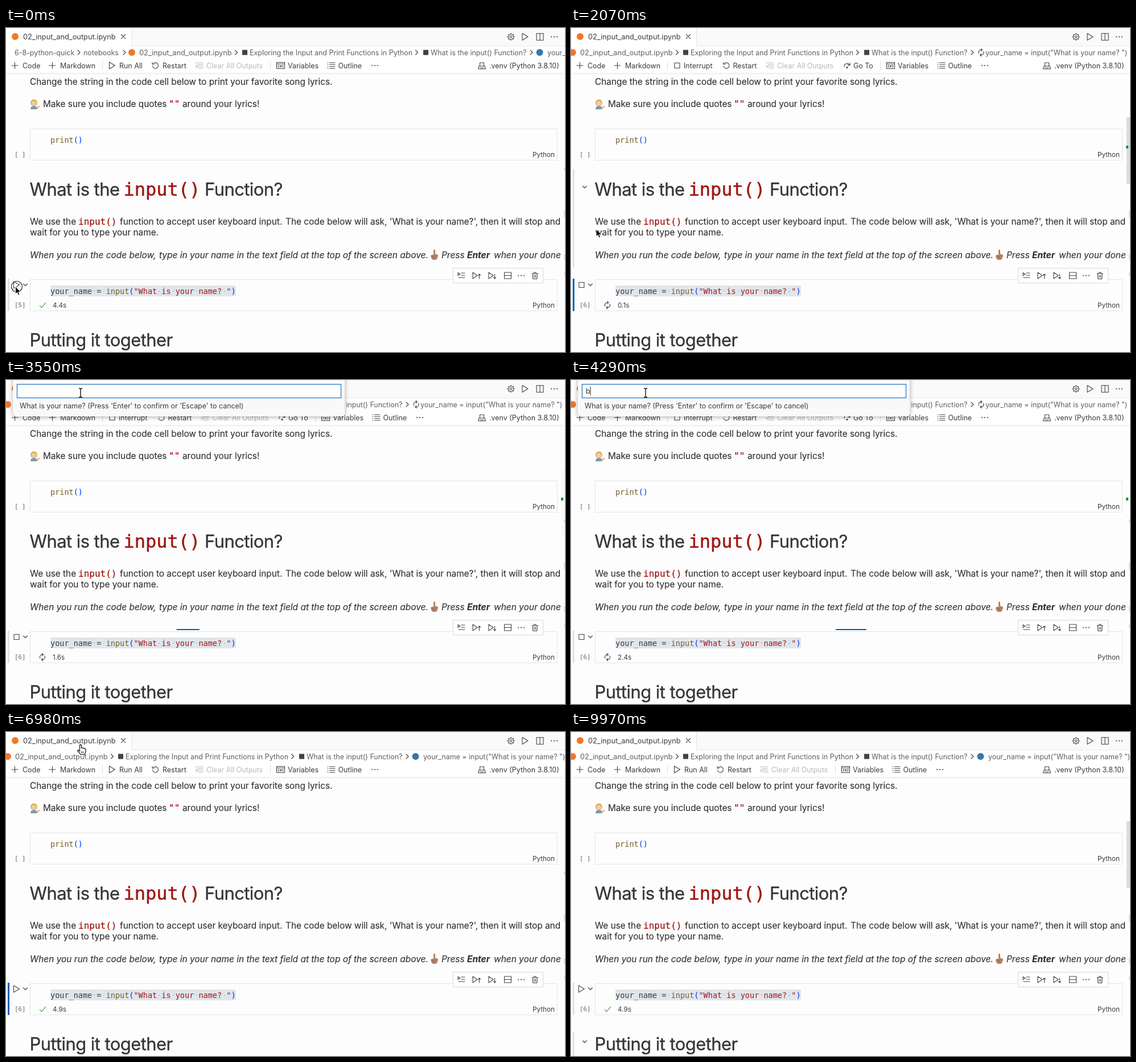
An HTML page that plays this animation: 982 px wide and 570 px high, repeating every 9990 ms.

```html
<!DOCTYPE html>
<html lang="en">
<head>
<meta charset="utf-8">
<title>Notebook input demo</title>
<style>
html, body { margin: 0; width: 100%; height: 100%; overflow: hidden; background: #fdfdfd; }
svg { display: block; width: 982px; height: 570px; }
text { font: 12.45px Inter, "Open Sans", sans-serif; font-optical-sizing: none; fill: #3b3b3b; white-space: pre; }
.file { font-size: 12.8px; }
.crumb text { fill: #5f5f5f; }
.small { font-size: 11.7px; }
.body { font-size: 15.36px; fill: #303030; stroke: #303030; stroke-width: .12; }
.head { font-size: 31px; letter-spacing: -.58px; fill: #363636; stroke: #363636; stroke-width: .35; }
.mono { font-family: "DejaVu Sans Mono", "Liberation Mono", monospace; font-size: 13.53px; }
.red { fill: #a31515; }
text.red { stroke: #a31515; stroke-width: .25; }
.brown { fill: #795e26; }
.blue { fill: #0431fa; }
.ital { font-style: italic; font-size: 15.45px; }
.off text { fill: #b9b9b9; }
.line { fill: none; stroke: #424242; stroke-width: 1.1; stroke-linejoin: round; stroke-linecap: round; }
.off .line { stroke: #b9b9b9; }
</style>
</head>
<body>
<svg id="stage" viewBox="0 0 982 570"></svg>
<script>
const LOOP = 9990, STEP = 148.6, LEAD = 25;
const NAME = "bolmup", KEY_TIMES = [4130, 4720, 5100, 5500, 5880, 6060];
const CHAR = 8.15, CODE_X = 78;
const CELLS = [[80, 146], [177, 233], [248, 421], [441, 498], [528, 570]];
const ACCENT = "#005fb8", IDLE_BAR = "#e1e1e1";

const text = (x, y, s, cls = "", extra = "") => `<text x="${x}" y="${y}" class="${cls}" ${extra}>${s}</text>`;
const rect = (x, y, w, h, fill, extra = "") => `<rect x="${x}" y="${y}" width="${w}" height="${h}" fill="${fill}" ${extra}/>`;
const line = (d, extra = "") => `<path class="line" d="${d}" ${extra}/>`;
const dot = (x, y, r, fill) => `<circle cx="${x}" cy="${y}" r="${r}" fill="${fill}"/>`;
const group = (id, body, extra = "") => `<g id="${id}" ${extra}>${body}</g>`;
const at = (x, y, body, extra = "") => `<g transform="translate(${x} ${y})" ${extra}>${body}</g>`;
const span = (cls, s) => `<tspan class="${cls}">${s}</tspan>`;

const plus = x => line(`M${x - 5.5} 66h11M${x} 60.5v11`);
const dots = (x, y) => [-5, 0, 5].map(d => dot(x + d, y, 1.1, "#424242")).join("");
const play = (x, y) => line(`M${x - 4.5} ${y - 6}l10 6l-10 6z`);
const down = (x, y) => line(`M${x - 3.5} ${y - 2}l3.5 3.5l3.5-3.5`);
const chevron = x => line(`M${x - 2} 39l4 4l-4 4`);
const sync = line("M-4.3-1.5A4.6 4.6 0 0 1 4-2.3M4.3 1.5A4.6 4.6 0 0 1-4 2.3M4.3-5v3h-3M-4.3 5v-3h3");
const divider = x => rect(x, 58, 1, 16, "#dcdcdc");

const iconRestart = x => at(x, 66, line("M-3.6-3.4A5 5 0 1 1-5 .7M-5.4-5.4v3.2h3.2"));
const iconClear = x => at(x, 66, line("M-6.5-4.5h13M-3-1.5h9.5M-1 1.5h7.5M-1 4.5h7.5M-6.5 0l4 4m0-4l-4 4"));
const iconVars = x => at(x, 66, line("M-7-5.5h14v11h-14zM-7-3h14M-3.6-.8q-1.5 2 0 4M3.6-.8q1.5 2 0 4M-1.5-.5l3 3.4m0-3.4l-3 3.4"));
const iconOutline = x => at(x, 66, line("M-6.5-5h1M-6.5-1.7h1M-6.5 1.7h1M-6.5 5h1M-3-5h9.5M-3-1.7h9.5M-3 1.7h9.5M-3 5h9.5"));
const iconGoTo = x => at(x, 66, line("M-5 2a5 5 0 0 1 9.5-2.5M5-4.5v4h-4") + dot(0, 3.5, 1.6, "#424242"));

function tabBar() {
  const teeth = Array.from({ length: 8 }, (_, i) =>
    `<path class="line" d="M0-5v-1.3" transform="rotate(${i * 45})"/>`).join("");
  return rect(0, 0, 982, 80, "#fff") + rect(220, 0, 762, 31, "#fafafa") +
    rect(220, 0, 1, 31, "#e5e5e5") + rect(220, 31, 762, 1, "#e8e8e8") +
    dot(16, 15, 6, "#f37726") + text(30, 19.5, "02_input_and_output.ipynb", "file") +
    line("M202.5 11.5l7 7m0-7l-7 7") +
    at(887, 15.5, `<circle class="line" r="4.8"/><circle class="line" r="1.8"/>` + teeth) +
    play(911.5, 15.5) + line("M932 9.5h12v12h-12zM938 9.5v12") + dots(963, 15.5);
}

function breadcrumb() {
  const square = x => rect(x, 38.5, 9, 9, "#424242");
  return group("crumbs",
    text(15, 47.5, "6-8-python-quick") + chevron(128) + text(136, 47.5, "notebooks") + chevron(208) +
    dot(221, 43, 6, "#f37726") + text(234, 47.5, "02_input_and_output.ipynb", "file") + chevron(404.5) +
    square(415) + text(428, 47.5, "Exploring the Input and Print Functions in Python") + chevron(721.5) +
    square(733) + text(746, 47.5, "What is the input() Function?") + chevron(923) +
    group("crumbIcon", dot(937.5, 43, 6, "#3776ab")) +
    at(938.5, 43, group("crumbSpin", sync)) +
    `<text id="crumbCode" x="951" y="47.5">your_name = input("What is your name? ")</text>`, `class="crumb"`);
}

function toolbar() {
  const clear = x => `<g class="off">${iconClear(x)}${text(x + 12.5, 70.5, "Clear All Outputs")}</g>`;
  const tail = x => divider(x) + iconVars(x + 18.5) + text(x + 31, 70.5, "Variables") +
    iconOutline(x + 107.5) + text(x + 119.5, 70.5, "Outline") + dots(x + 184, 66);
  return group("markdownHover", rect(72, 57, 88, 18, "#ebebeb", `rx="4"`)) +
    plus(15.5) + text(29, 70.5, "Code") + plus(81.5) + text(95, 70.5, "Markdown") + divider(169) +
    group("idleTools", play(186, 66) + text(199, 70.5, "Run All") + iconRestart(262.5) +
      text(275, 70.5, "Restart") + clear(339.5) + tail(464)) +
    group("busyTools", line("M182 61.5h9v9h-9z") + text(198, 70.5, "Interrupt") + iconRestart(273) +
      text(284.5, 70.5, "Restart") + clear(349.5) + iconGoTo(485) + text(496, 70.5, "Go To") + tail(543)) +
    line("M832.5 61h7v6h-7zM831 67l-1.5 5h13l-1.5-5zM833 70h6") +
    text(849, 70.5, ".venv (Python 3.8.10)") + rect(0, 79, 982, 1, "#ececec") + rect(0, 80, 982, 2, "#f7f7f7");
}

const person = at(41, 125,
  `<path d="M2 18q0-6 6-6t6 6z" fill="#7d9aa8"/><circle cx="8" cy="6.5" r="6" fill="#dcb04c"/>
   <circle cx="8" cy="7.5" r="4.1" fill="#f1cda6"/><path d="M12 17l3-5l4 0l-1 2l-3 3z" fill="#e8bd92"/>`);
const finger = at(744, 389,
  `<path d="M7 1.500q1.500-1.500 3 0v7l4 1q1.500 1 1 3l-1.500 4q-1 2.500-4 2.500h-2q-3 0-4-2.500l-1.500-4q0-2 2-2.500l3 0z" fill="#b5856a"/>
   <path d="M4 12.500h6M5 15.500h5" stroke="#8c5f49" fill="none"/>`);

const cellBox = y => rect(42.5, y + .5, 926, 55, "#fdfdfd", `stroke="#e4e4e4"`);

function notebook() {
  const code = `your_name = ${span("brown", "input")}${span("blue", "(")}${span("red", '"What is your name? "')}${span("blue", ")")}`;
  const plain = 'your_name = input("What is your name? ")';
  const spaces = [...plain].map((c, i) => c === " " ? dot(CODE_X + CHAR * (i + .5), 463, .9, "#a9b4bd") : "").join("");
  return text(42, 99.5, "Change the string in the code cell below to print your favorite song lyrics.", "body") +
    person + text(65, 139, "Make sure you include quotes", "body") +
    text(286, 139, '""', "mono red", `style="font-size:16px"`) + text(310, 139, "around your lyrics!", "body") +
    cellBox(177) + text(CODE_X, 202, span("brown", "print") + span("blue", "()"), "mono") +
    text(15, 226, "[ ]", "mono", `style="font-size:10.8px;fill:#6a6a6a"`) + text(925, 226.5, "Python", "small") +
    text(41.5, 295, "What is the", "head") +
    text(206.5, 295, "input()", "mono red", `style="font-size:32px;stroke-width:.5"`) + text(349, 295, "Function?", "head") +
    text(42, 345.5, "We use the", "body") + text(127, 345.5, "input()", "mono red", `style="font-size:16px"`) +
    text(200, 345.5, "function to accept user keyboard input.", "body") +
    text(491, 345.5, "The code below will ask, 'What is your name?', then it will stop and", "body") +
    text(42, 364.5, "wait for you to type your name.", "body") +
    text(42, 404.5, "When you run the code below,", "body ital") +
    text(269, 404.5, "type in your name in the text field at the top of the screen above.", "body ital") + finger +
    text(765, 404.5, "Press", "body ital") + text(810, 404.5, "Enter", "body ital", `style="font-weight:700"`) +
    text(857, 404.5, "when your done", "body ital") +
    cellBox(442) + rect(CODE_X, 453, 326, 19, "#dfe6ec", `rx="2"`) + spaces + text(CODE_X, 467.5, code, "mono") +
    `<text id="count" x="15" y="491" class="mono" style="font-size:10.8px;fill:#6a6a6a"></text>` +
    `<path id="check" class="line" d="M59.500 488.500l3 3.500l7-8.500" style="stroke:#388a34"/>` +
    at(64, 487.5, group("spin", sync)) + `<text id="timer" x="82" y="491.500" class="small"></text>` +
    text(925, 491.5, "Python", "small") + text(41.5, 560, "Putting it together", "head") +
    [[245, 6], [321, 12], [398, 10], [430, 5]].map(([y, h]) => rect(980.5, y, 1.5, h, "#d2d2d2")).join("") +
    `<rect id="progress" y="438" height="2" fill="${ACCENT}"/>`;
}

function cellControls() {
  const tools = rect(785.5, 422.5, 158, 26, "#fff", `stroke="#d9d9d9"`) +
    line("M794 430.500l4 2.500l-4 2.500zM800 431h6M800 435h6M795 439h11") +
    line("M820 430l8 5.500l-8 5.500zM831.500 441v-8m-2 2l2-2l2 2") +
    line("M848 430l8 5.500l-8 5.500zM858.500 433v8m-2-2l2 2l2-2") +
    line("M875.500 430h12v11h-12zM875.500 435.500h12") + dots(905, 435.5) +
    line("M924 432h10.500M927.500 432v-2h3.500v2M925 432l.700 9.500h7l.700-9.500M928 434.500v4.500M930.500 434.500v4.500");
  return `<rect id="hoverBar" x="3" width="3" fill="${IDLE_BAR}"/>` +
    `<rect id="focusBar" x="3" y="441" width="3" height="57"/>` +
    group("runHover", rect(8, 443, 32, 21, "#e4e4e4", `rx="4"`)) +
    group("ring", `<circle cx="19" cy="455" r="9.500" fill="#fff" fill-opacity=".6" stroke="#222" stroke-width="1.200"/>`) +
    group("playIcon", play(18, 452)) + group("stopIcon", line("M14 447.500h9v9h-9z")) + down(34, 452) +
    group("printPlay", play(18, 188) + down(34, 188)) + group("headFold", down(24, 280)) + group("lastFold", down(24, 545)) + tools +
    group("scrollbar", rect(976, 157, 6, 117, "#dadada")) + group("runMark", rect(975, 207, 4, 5, "#2f8a2f"));
}

const popup = group("popup",
  `<rect x="12" y="-10" width="583" height="74" rx="6" fill="#f9f9f9" style="filter:drop-shadow(0 1px 4px #0005)"/>` +
  rect(19.5, 7.5, 569, 24, "#fff", `stroke="${ACCENT}"`) +
  `<text id="typed" x="26" y="24"></text><rect id="caret" y="12" width="1" height="15" fill="#111"/>` +
  text(24, 49.5, "What is your name? (Press 'Enter' to confirm or 'Escape' to cancel)"));

const cursor = group("cursor",
  group("arrow", `<path d="M0 0v13l3-2.800l2.200 5l2.300-1l-2.200-4.800h4.200z" fill="#000" stroke="#fff"/>`) +
  group("hand", `<path d="M-1.500 1q1.500-1.500 3 0v5q1.500-1 2.500.500q1.500-.800 2.500.700q2-.500 2.500 1.300v3.500l-1.500 5.500h-7.500l-5-6q-.500-2 1.200-1.800l2.300 2z" fill="#fff" stroke="#111" stroke-width="1.200"/><path d="M2 12v3.500M4.500 12v3.500" stroke="#111"/>`) +
  group("beam", `<path d="M-3-7.500q3 0 3 2q0-2 3-2M0-5.500v12M-3 8.500q3 0 3-2q0 2 3 2" fill="none" stroke="#111" stroke-width="1.400"/>`));

const stage = document.getElementById("stage");
stage.innerHTML = rect(0, 0, 982, 570, "#fdfdfd") + notebook() + cellControls() +
  tabBar() + breadcrumb() + toolbar() + popup + cursor;
const el = {};
stage.querySelectorAll("[id]").forEach(node => el[node.id] = node);

const show = (id, on) => el[id].setAttribute("display", on ? "inline" : "none");
const set = (id, attrs) => { for (const k in attrs) el[id].setAttribute(k, attrs[k]); };
const within = (t, a, b) => t >= a && t < b;
const clamp01 = v => Math.min(1, Math.max(0, v));
const ease = v => v * v * (3 - 2 * v);

// time, x, y of the pointer's resting points
const PATH = [[0, 16.5, 455], [1790, 16.5, 455], [2660, 123, 66], [2830, 123, 66],
  [3300, 131, 22], [8250, 131, 22], [9200, 930, 592], [LOOP, 930, 592]];
function pointer(t) {
  const i = Math.max(1, PATH.findIndex(p => p[0] > t));
  const [t0, x0, y0] = PATH[i - 1], [t1, x1, y1] = PATH[i];
  const k = ease((t - t0) / (t1 - t0));
  return [x0 + (x1 - x0) * k, y0 + (y1 - y0) * k];
}

function drawPointer(t) {
  const [x, y] = pointer(t);
  set("cursor", { transform: `translate(${x} ${y})` });
  const beam = within(t, 3050, 6600);
  const hand = !beam && (within(t, 1000, 1800) || (t > 1800 && y < 80));
  show("beam", beam);
  show("hand", hand);
  show("arrow", !beam && !hand);

  const roaming = within(t, 1790, 2950) || (t > 8250 && y > 80);
  const below = CELLS.findIndex(c => y <= c[1]);
  const cell = !roaming ? -1 : below < 0 ? CELLS.length - 1 : below;
  show("hoverBar", cell >= 0);
  if (cell >= 0) set("hoverBar", { y: CELLS[cell][0], height: CELLS[cell][1] - CELLS[cell][0] });
  show("printPlay", cell === 1);
  show("headFold", cell === 2);
  show("lastFold", cell === 4);
  show("markdownHover", within(t, 2600, 2950));
  const fade = t < 1000 ? 0 : t < 8250 ? 1 - clamp01((t - 2900) / 800) : +(y > 80);
  set("scrollbar", { opacity: fade });
}

function drawRun(t) {
  const running = within(t, 1860, 6750);
  const ran = t >= 1860;
  show("playIcon", !running);
  show("stopIcon", running);
  show("check", !running);
  show("spin", running);
  show("idleTools", !running);
  show("busyTools", running);
  show("runMark", running);
  show("crumbIcon", !running);
  show("crumbSpin", running);
  set("crumbs", { transform: `translate(${ran ? -218 : 0} 0)` });
  set("crumbCode", { x: running ? 946 : 951 });
  const turn = `rotate(${(t * .24) % 360})`;
  set("spin", { transform: turn });
  set("crumbSpin", { transform: turn });
  el.count.textContent = ran ? "[6]" : "[5]";
  const secs = Math.floor((t - 1885) / 100) / 10;
  el.timer.textContent = (running ? Math.max(0, secs) : ran ? 4.9 : 4.4).toFixed(1) + "s";
  set("focusBar", { fill: within(t, 670, 2450) || within(t, 6750, 9900) ? ACCENT : IDLE_BAR });
  show("ring", within(t, 0, 100) || within(t, 520, 670) || within(t, 1560, 1710));
  show("runHover", within(t, 1000, 1800));

  const busyBar = within(t, 2408, 6750);
  show("progress", busyBar);
  if (busyBar) {
    const unit = 927 * .02, p = (t - 2408) / 4000 % 1;
    const shift = p < .5 ? 50 * p : 25 + 48 * (p - .5);
    const width = unit * (3 - 4 * Math.abs(p - .5));
    set("progress", { x: 42 + unit * (shift + .5) - width / 2, width });
  }
}

function drawPopup(t) {
  show("popup", within(t, 2450, 6600));
  const typed = NAME.slice(0, KEY_TIMES.filter(k => t >= k).length);
  el.typed.textContent = typed;
  set("caret", { x: 26 + (typed ? el.typed.getComputedTextLength() : 0) });
  show("caret", typed || Math.floor((t - 2450) / 500) % 2);
}

function render(now) {
  const t = Math.floor((now % LOOP + LEAD) / STEP) * STEP;
  drawPointer(t);
  drawRun(t);
  drawPopup(t);
}

const start = performance.now();
function tick() {
  render(performance.now() - start);
  requestAnimationFrame(tick);
}
tick();
</script>
</body>
</html>
```
